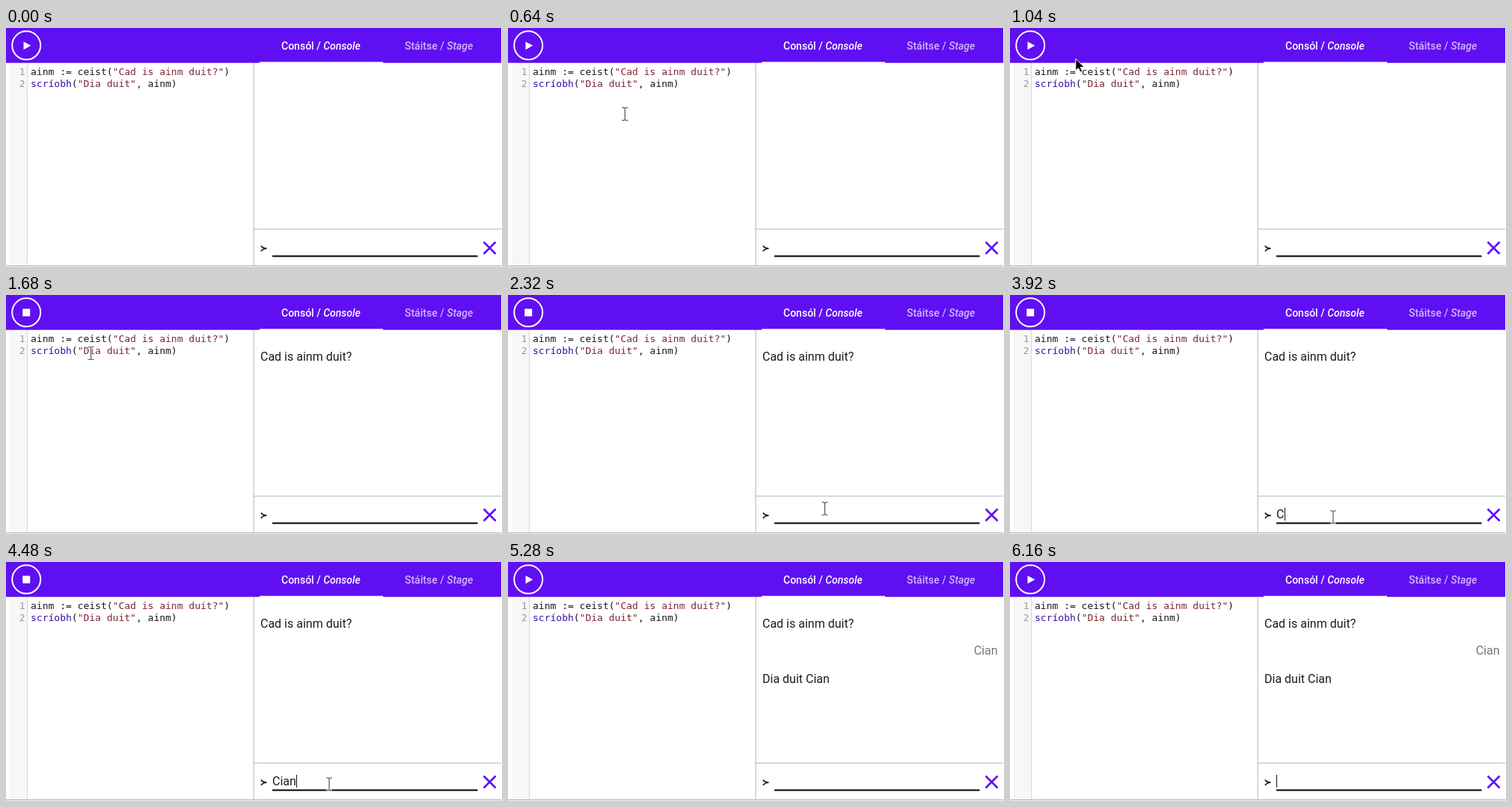
Write an HTML page that moves like this. It is 663 px wide and 320 px high and loops after 6.32 s.

```html
<!DOCTYPE html>
<html lang="ga">
<head>
<meta charset="utf-8">
<title>Consól</title>
<style>
  html, body { margin: 0; width: 100%; height: 100%; overflow: hidden; background: #fff; }
  svg { display: block; width: 663px; height: 320px; }
  text { white-space: pre; }
  .tab { font: 500 14px Roboto, sans-serif; fill: #fff; }
  .code { font: 13px "DejaVu Sans Mono", monospace; fill: #1c1420; }
  .num { fill: #999; text-anchor: end; }
  .str { fill: #7c2632; }
  .fn { fill: #3a0ca3; }
  .out { font: 16px Roboto, sans-serif; fill: #1c1a20; }
  .echo { fill: #757575; text-anchor: end; }
  .it { font-style: italic; }
</style>
</head>
<body>
<svg viewBox="0 0 663 320">
  <rect width="663" height="320" fill="#fff"/>
  <rect x="5" y="46" width="23" height="272" fill="#f7f7f7"/>
  <rect x="28" y="46" width="1" height="272" fill="#d8d8d8"/>
  <rect x="330.6" y="46" width="1" height="272" fill="#b4b4b4"/>
  <rect x="331" y="268.7" width="331" height="1" fill="#b4b4b4"/>
  <rect y="318" width="662" height="1" fill="#a8a8a8"/>

  <rect width="662" height="46.7" fill="#600ff2"/>
  <rect x="339" y="45.4" width="165" height="2" fill="#fff"/>
  <circle cx="27.2" cy="23.3" r="19" fill="none" stroke="#fff" stroke-width="2"/>
  <path id="play" d="M23.5 18.2V29L33.3 23.6Z" fill="#fff"/>
  <rect id="stop" x="22.2" y="18.5" width="10" height="10" fill="#fff"/>
  <text class="tab" x="368" y="29.3">Consól / <tspan class="it">Console</tspan></text>
  <text class="tab" x="533" y="29.3" opacity=".7">Stáitse / <tspan class="it">Stage</tspan></text>

  <text class="code num" x="25.5" y="63">1</text>
  <text class="code num" x="25.5" y="78.5">2</text>
  <text class="code" x="33" y="63">ainm := ceist(<tspan class="str">"Cad is ainm duit?"</tspan>)</text>
  <text class="code" x="33" y="78.5"><tspan class="fn">scríobh</tspan>(<tspan class="str">"Dia duit"</tspan>, ainm)</text>

  <text id="ask" class="out" x="340" y="88">Cad is ainm duit?</text>
  <g id="reply">
    <text class="out echo" x="654.5" y="124">Cian</text>
    <text class="out" x="340" y="162">Dia duit Cian</text>
  </g>

  <path d="M341 291.5Q343 295 348.5 295.3Q343 295.6 341 299" fill="none" stroke="#111" stroke-width="1.6"/>
  <rect x="356" y="304.5" width="274.5" height="2" fill="#000"/>
  <path d="M638.5 286.5L654.5 302.5M654.5 286.5L638.5 302.5" stroke="#600ff2" stroke-width="2.6"/>
  <text id="entry" class="out" x="356" y="299"></text>
  <rect id="caret" x="356" y="285" width="1" height="17" fill="#111"/>

  <path id="arrow" d="M0 0V16L3.6 12.7L6.2 18.2L9 17L6.4 11.5H11.4Z" fill="#000" stroke="#fff" stroke-width="1"/>
  <g id="beam" fill="none">
    <path d="M-4 -8.5H-1.5L0 -7.5L1.5 -8.5H4M0 -7.5V7.5M-4 8.5H-1.5L0 7.5L1.5 8.5H4" stroke="#fff" stroke-width="2.6"/>
    <path d="M-4 -8.5H-1.5L0 -7.5L1.5 -8.5H4M0 -7.5V7.5M-4 8.5H-1.5L0 7.5L1.5 8.5H4" stroke="#555" stroke-width="1.2"/>
  </g>
</svg>
<script>
const LOOP = 6320, STEP = 80, BLINK = 530;
const RUN = 1440, FOCUS = 2560, TYPE = 3920, KEY = 160, ENTER = 4720;
const NAME = "Cian";
// Pointer stops: time, x, y
const PATH = [
  [560, 170, 130], [1040, 87.8, 41], [1200, 36, 26],
  [1520, 36, 26], [2320, 423.5, 286], [2560, 432, 297.5]
];
const el = id => document.getElementById(id);
const show = (id, on) => el(id).setAttribute("visibility", on ? "visible" : "hidden");

function pointerAt(t) {
  for (let i = 1; i < PATH.length; i++) {
    const [t0, x0, y0] = PATH[i - 1], [t1, x1, y1] = PATH[i];
    if (t < t1) {
      const k = (t - t0) / (t1 - t0);
      return [x0 + (x1 - x0) * k, y0 + (y1 - y0) * k];
    }
  }
  return PATH[PATH.length - 1].slice(1);
}

function drawPointer(t) {
  const on = t >= PATH[0][0] && t < ENTER;
  const [x, y] = pointerAt(t);
  const overText = (y > 47 && x < 331) || y > 275;
  show("arrow", on && !overText);
  show("beam", on && overText);
  for (const id of ["arrow", "beam"]) el(id).setAttribute("transform", `translate(${x} ${y})`);
}

function drawEntry(t) {
  const typing = t >= TYPE && t < ENTER;
  const count = typing ? Math.min(NAME.length, Math.floor((t - TYPE) / KEY) + 1) : 0;
  const entry = el("entry");
  entry.textContent = NAME.slice(0, count);
  const end = count ? entry.getComputedTextLength() + 0.5 : 0;
  el("caret").setAttribute("x", Math.round(356 + end));
  // Every key press restarts the blink
  const since = t >= ENTER ? t - ENTER : typing ? t - TYPE - (count - 1) * KEY : t - FOCUS;
  show("caret", t >= FOCUS && Math.floor(since / BLINK) % 2 === 0);
}

function draw(now) {
  const t = Math.floor((now % LOOP) / STEP) * STEP;
  const running = t >= RUN && t < ENTER;
  show("play", !running);
  show("stop", running);
  show("ask", t >= RUN);
  show("reply", t >= ENTER);
  drawPointer(t);
  drawEntry(t);
}

const start = performance.now();
function tick() {
  draw(performance.now() - start);
  requestAnimationFrame(tick);
}
tick();
</script>
</body>
</html>
```
